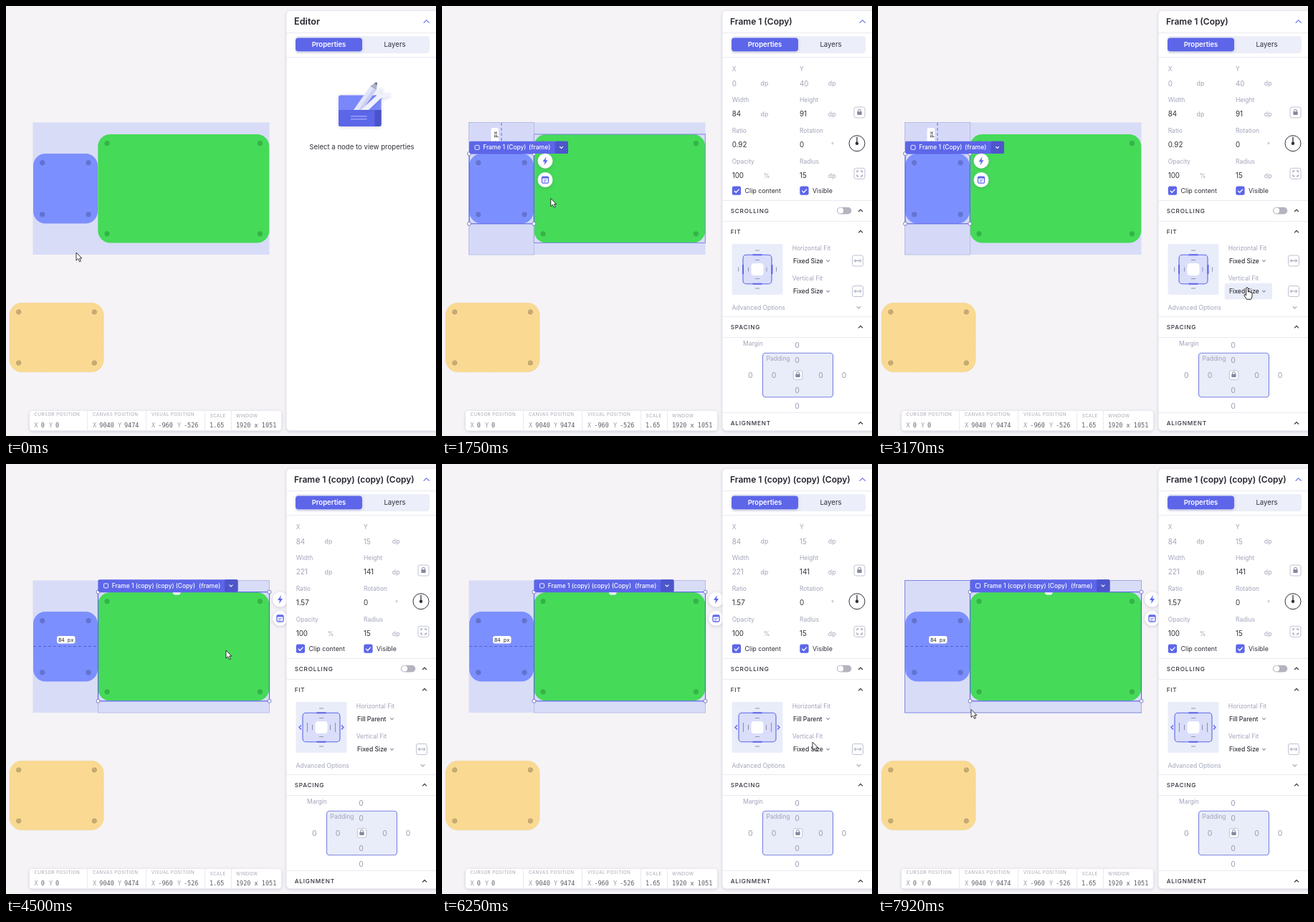
Write an HTML page that moves like this. It is 600 px wide and 600 px high and loops after 8 s.

```html
<!DOCTYPE html>
<html lang="en">
<head>
<meta charset="utf-8">
<title>Frame editor</title>
<style>
html, body { margin: 0; width: 100%; height: 100%; overflow: hidden; background: #f5f3f6; }
svg { display: block; width: 600px; height: 600px; }
text { font-family: Inter, sans-serif; white-space: pre; }
.mono { font-family: "DejaVu Sans Mono", monospace; }
.mid { text-anchor: middle; }
.caps { letter-spacing: .8px; font-weight: 500; }
.tiny { letter-spacing: .45px; }
.semi { font-weight: 600; }
.med { font-weight: 500; }
.shadow { filter: drop-shadow(0 1px 2px #4a4a7a40); }
</style>
</head>
<body>
<svg id="stage" viewBox="0 0 600 600"></svg>
<script>
const BLUE = '#5d66e9', INK = '#30303a', GREY = '#a2a4b8', PALE = '#e9ecf9', RULE = '#e9e9f3';

// Drawing helpers, all returning SVG markup
const rect = (x, y, w, h, r, fill, more = '') =>
  `<rect x="${x}" y="${y}" width="${w}" height="${h}" rx="${r}" fill="${fill}" ${more}/>`;
const path = (d, stroke, width = 1, more = '') =>
  `<path d="${d}" fill="none" stroke="${stroke}" stroke-width="${width}" ${more}/>`;
const dot = (x, y, r, fill, more = '') => `<circle cx="${x}" cy="${y}" r="${r}" fill="${fill}" ${more}/>`;
const text = (x, y, s, size, fill, cls = '', more = '') =>
  `<text x="${x}" y="${y}" font-size="${size}" fill="${fill}" class="${cls}" ${more}>${s}</text>`;
const line = (color, width = 1) => `stroke="${color}" stroke-width="${width}"`;
const group = (id, body, more = '') => `<g id="${id}" ${more}>${body}</g>`;
const chevron = (x, y, up, color, w = 3) =>
  path(`M${x - w} ${y + up * w / 2}L${x} ${y - up * w / 2}L${x + w} ${y + up * w / 2}`, color, 1.1);
const corners = (x, y, w, h, draw) =>
  [[x, y], [x + w, y], [x, y + h], [x + w, y + h]].map(p => draw(...p)).join('');

const boxes = {
  root: [37.5, 162.5, 330, 184.5],
  blue: [38, 206, 90, 97.5],
  green: [128.3, 179, 239, 151.5],
};

function card([x, y, w, h], fill, draw, more) {
  return rect(x, y, w, h, 17, fill, more) + corners(x + 12.7, y + 12.7, w - 25.6, h - 25.4, draw);
}

function canvas() {
  const ring = (x, y) => dot(x, y, 3.1, '#d9bb7c', line('#a58e60', .8))
    + path(`M${x - 1.8} ${y + 1.2}l2.8 -2.8M${x - .7} ${y + 1.8}l2.5 -2.5`, '#8d7a55', .6);
  return rect(...boxes.root, 0, '#d8dcf7')
    + card(boxes.blue, '#7c8ffe', (x, y) => dot(x, y, 3.6, '#6272cf'))
    + card(boxes.green, '#45da58', (x, y) => dot(x, y, 3.6, '#35b348'))
    + card([5, 414.2, 131.2, 96.5], '#fad992', ring, line('#e6c681', .7) + ' stroke-dasharray="1 1.4"');
}

function statusBar() {
  const label = (x, s, y = 572.4) => text(x, y, s, 6.2, '#a6a6b4', 'tiny');
  const value = (x, s, fill = '#5c5c68') => text(x, 587.6, s, 8.5, fill, 'mono');
  const pair = (x, a, y, b) => value(x, 'X', '#9c9cac') + value(x + 9.3, a)
    + value(y, 'Y', '#9c9cac') + value(y + 9, b);
  return rect(33, 565, 351, 27.5, 4, '#fff', 'class="shadow"')
    + path('M113.5 565v27M195.5 565v27M277.5 565v27M314.5 565v27', RULE)
    + label(39.5, 'CURSOR POSITION') + pair(39.5, '0', 60, '0')
    + label(121, 'CANVAS POSITION') + pair(121, '9040', 156, '9474')
    + label(203, 'VISUAL POSITION') + pair(203, '-960', 239, '-526')
    + label(284.5, 'SCALE', 574.3) + value(284, '1.65')
    + label(321, 'WINDOW', 574.3) + value(321, '1920 x 1051');
}

function roundButtons(x, y) {
  return `<g class="shadow">${dot(x, y, 10.5, '#fff')}${dot(x, y + 26.3, 10.5, '#fff')}</g>`
    + `<path d="M${x + 1.5} ${y - 6}l-5 7h3l-1 5 5 -7h-3z" fill="${BLUE}"/>`
    + rect(x - 4.5, y + 22, 9, 9, 1.5, 'none', line(BLUE, 1.3))
    + path(`M${x - 4.5} ${y + 23.3}h9`, BLUE, 2.2) + path(`M${x - 2.3} ${y + 26.7}h4.6M${x - 2.3} ${y + 28.7}h3`, BLUE, .9);
}

function tag(x, y, w, name, kindX) {
  return rect(x, y, w, 17.3, 2, BLUE) + rect(x + w - 18.5, y, 18.5, 17.3, 2, '#4d55cb')
    + rect(x + 8, y + 5.7, 6, 6, 1.2, 'none', line('#fff', .9))
    + text(x + 19.2, y + 11.6, name, 8.4, '#fff', 'med')
    + text(kindX, y + 11.6, '(frame)', 8.6, '#fff', 'med')
    + chevron(x + w - 9.5, y + 8.6, -1, '#fff', 2.4);
}

const outline = (x, y, w, h) => rect(x, y, w, h, 0, 'none', line(BLUE, 1.2))
  + corners(x, y, w, h, (a, b) => dot(a, b, 2.5, '#fff', line('#777cc0', 1)));

function selectBlue() {
  return rect(37.5, 162.5, 91, 184.5, 0, '#7c8ffe0a', line('#aeb3e0', .8))
    + path('M83 163V206', BLUE, 1, 'stroke-dasharray="4 3"')
    + rect(68.5, 170, 10.5, 26, 3, '#fff')
    + text(0, 0, '40 px', 7.5, '#222', 'mono mid', 'transform="translate(76.5 186)rotate(-90)"')
    + outline(38, 206, 90.3, 97.8) + tag(38, 188.7, 138, 'Frame 1 (Copy)', 121) + roundButtons(144, 216.2);
}

function selectGreen() {
  return rect(128.5, 162.5, 239, 184.5, 0, 'none', line('#aeb3e0', .8))
    + path('M38 254.5H128', '#5560cf', 1, 'stroke-dasharray="4 3"')
    + rect(71, 240, 25.5, 10.5, 3, '#fff') + text(83.7, 248, '84 px', 7.2, '#222', 'mono mid')
    + rect(233, 160, 10.5, 22.5, 3, '#fff')
    + outline(128.5, 178.6, 239, 152.2)
    + tag(128.5, 161.2, 195, 'Frame 1 (copy) (copy) (Copy)', 269) + roundButtons(382.5, 189);
}

function panelFrame() {
  return rect(391.5, 7, 216, 585.5, 5, '#fff', 'class="shadow"')
    + path('M392 37.5H600M392 71.5H600', RULE)
    + chevron(586.7, 21.7, 1, BLUE, 4)
    + rect(404, 42, 187, 24, 4, '#eceef9')
    + rect(404, 44.5, 93, 18.7, 4, BLUE, 'class="shadow"')
    + text(450.5, 57.4, 'Properties', 9.5, '#fff', 'mid semi')
    + text(542.5, 57.4, 'Layers', 9.6, INK, 'mid');
}

function emptyPanel() {
  return rect(464, 124.5, 59.5, 43.5, 3, '#7a87fb', 'class="shadow"')
    + '<path d="M464 145h59.500v20a3 3 0 0 1-3 3h-53.500a3 3 0 0 1-3-3z" fill="#5c66e8"/>'
    + '<path d="M514.500 145h9v20a3 3 0 0 1-3 3h-6z" fill="#4b53cb"/>'
    + path('M481 153.800h22.500M481 157.800h22.500', '#a6aefc', 1.3)
    + '<path d="M485 145L508 112 517 117 497 145z" fill="#e3e6fa"/><path d="M492 145L512.500 114.500 517 117 497 145z" fill="#cdd2f3"/>'
    + '<path d="M508 112l8-5.500 2 1.500-1 9z" fill="#aeb2c6"/><path d="M514 108l2.500-1.800 1.600 1.200-.5 3z" fill="#70758f"/>'
    + '<path d="M495 145L517 125Q515 118 523 115L527 116 522 120 526 124 535 121 536 125Q531 130 524 128L506 145z" fill="#eef0fc" class="shadow"/>'
    + text(496.5, 200.3, 'Select a node to view properties', 9.6, INK, 'mid');
}

function lock(x, y) {
  return rect(x - 3.2, y - .7, 6.4, 4.6, .8, '#85889f')
    + path(`M${x - 2} ${y}v-1.700a2 2 0 0 1 4 0v1.700`, '#85889f', 1);
}
const iconBox = (x, y, s = 15) => rect(x, y, s, s, 2.5, '#fff', line('#b9bbcf', .9));

function fitWidget(fill) {
  const x = fill ? 414 : 420, right = 880 - x;
  const ticks = 'M437 341h6M437 394h6M437 354.500h6M437 380.500h6';
  return rect(404.5, 332, 71, 70.7, 2, PALE)
    + rect(x, 347.3, right - x, 40.5, 4.5, '#dadefa', line(BLUE, 1.1))
    + path('M433.500 347.300h13M433.500 387.800h13', BLUE, 2)
    + path(ticks, '#8f93ab', 1)
    + (fill
      ? path('M412 364.500l-3 3 3 3M468 364.500l3 3 -3 3', BLUE, 1.4)
        + path('M420.500 361v13M459.500 361v13M427.500 364v7M452.500 364v7', '#8f93ab', 1.1)
      : path('M420 361v13M460.500 361v13', BLUE, 2)
        + path('M413.700 364.500v6M466.500 364.500v6M427.500 364.500v6M453 364.500v6', '#8f93ab', 1))
    + rect(431.5, 359, 17, 17, 4, '#fff');
}

function props(green) {
  const label = (x, y, s) => text(x, y, s, 8.5, '#a1a4ba');
  const value = (x, y, s, off) => text(x, y, s, 9.8, off ? GREY : INK);
  const unit = (x, y, s) => text(x, y, s, 8.8, GREY);
  const field = (col, y, name, val, u, off) => {
    const x = col ? 499 : 404.7;
    return label(x, y, name) + value(x, y + 20.3, val, off)
      + (u ? unit(u === 'dp' ? x + 39.8 : x + 44, y + 20, u) : '');
  };
  const section = (y, s) => text(402.7, y + 3.3, s, 8.2, INK, 'caps') + chevron(584, y, 1, INK);
  const check = (x, s) => rect(x, 251.5, 12.3, 12.3, 2.5, BLUE)
    + path(`M${x + 3} 257.800l2.400 2.400 4.300 -4.600`, '#fff', 1.3)
    + text(x + 17.7, 261, s, 8.9, INK);
  const menu = (y, s, box) => text(490, y + 3.1, s, 8.6, INK, 'med') + chevron(538.5, y, -1, '#8e90a6', 2.2)
    + (box ? iconBox(572.5, y - 7.5)
      + path(`M577.500 ${y - 2.3}l-2.300 2.300 2.300 2.300M582.500 ${y - 2.3}l2.300 2.300 -2.300 2.300M575.500 ${y}h9`, '#9295ad', .9) : '');
  const zero = (x, y) => text(x, y, '0', 10.5, '#999cb2', 'mid');

  return field(0, 91.3, 'X', green ? '84' : '0', 'dp', true) + field(1, 91.3, 'Y', green ? '15' : '40', 'dp', true)
    + field(0, 133.8, 'Width', green ? '221' : '84', 'dp', green) + field(1, 133.8, 'Height', green ? '141' : '91', 'dp')
    + field(0, 177, 'Ratio', green ? '1.57' : '0.92') + field(1, 177, 'Rotation', '0', '°')
    + field(0, 219.6, 'Opacity', '100', '%') + field(1, 219.6, 'Radius', '15', 'dp')
    + iconBox(575, 141) + lock(582.5, 148)
    + dot(579, 191.7, 11, '#fff', line(INK, 1)) + path('M579 191.700v-9', INK, 1.3) + dot(579, 191.7, 2.2, INK)
    + iconBox(575, 226.3)
    + path('M579 232.300v-2.300h2.300M584 230h2.300v2.300M586.300 235.300v2.300h-2.300M581.300 237.600h-2.300v-2.300', '#85889f', 1)
    + check(404.8, 'Clip content') + check(499.3, 'Visible')
    + path('M392 271.500H600M392 300.500H600M392 433.500H600M392 462.500H600M392 567.500H600', RULE)
    + section(285.5, 'SCROLLING')
    + rect(551, 280.7, 20.3, 9.8, 4.9, '#b4b4c0') + dot(556.2, 285.6, 4, '#fff')
    + section(314.8, 'FIT') + fitWidget(green)
    + label(488.7, 340.8, 'Horizontal Fit') + menu(355.5, green ? 'Fill Parent' : 'Fixed Size', !green)
    + label(488.7, 383.4, 'Vertical Fit') + menu(398, 'Fixed Size', true)
    + label(404.5, 423.7, 'Advanced Options') + chevron(581.5, 420.6, -1, GREY, 2.8)
    + section(447.8, 'SPACING')
    + label(420, 473.7, 'Margin') + zero(495.5, 477.2) + zero(430.3, 519.2) + zero(561, 519.2) + zero(495.5, 561.5)
    + rect(447.5, 484.3, 98, 61.5, 4, PALE, line('#7982e0', 1.1))
    + label(452.5, 494.6, 'Padding') + zero(495.5, 498) + zero(463, 519.2) + zero(528.5, 519.2) + zero(495.5, 540.3)
    + iconBox(490.3, 508.7, 12.5) + lock(496.5, 514.2)
    + section(582, 'ALIGNMENT');
}

const arrow = '<path id="arrow" d="M0 0V11L2.600 8.700 4.600 12.800 6.400 12 4.600 8H7.900Z" fill="#fff" stroke="#222" stroke-width=".9"/>';
const hand = '<path id="hand" d="M-1.400 1.200a1.400 1.400 0 0 1 2.800 0V6Q4 5 4.300 6.600 6.600 6 7 8.200V11.500Q7 14 5.400 16.300H-.4L-3.800 11.500Q-4.600 9.600 -3 9.400L-1.400 10.800Z" fill="#fff" stroke="#222" stroke-width="1"/>'
  ;

stage.innerHTML = '<clipPath id="titleClip"><rect x="402" y="8" width="176" height="28"/></clipPath>'
  + canvas() + rect(0, 0, 0, 0, 0, 'none', 'id="hover" ' + line('#7f86e2', 1))
  + group('blueSel', selectBlue()) + group('greenSel', selectGreen())
  + statusBar() + panelFrame()
  + `<g clip-path="url(#titleClip)">${text(402, 25.8, '', 12, '#25252e', 'semi', 'id="heading"')}</g>`
  + group('emptyProps', emptyPanel())
  + rect(483.7, 0, 66.3, 22.5, 2.5, PALE, 'id="menuHover"')
  + group('blueProps', props(false)) + group('greenProps', props(true))
  + group('cursor', arrow + hand);

const $ = id => document.getElementById(id);
const show = (id, on) => $(id).setAttribute('display', on ? 'inline' : 'none');
const set = (id, attrs) => { for (const k in attrs) $(id).setAttribute(k, attrs[k]); };

// Cursor moves: first step, last step, x, y (12 steps a second)
const moves = [
  [0, 3, 55, 245], [18, 28, 503, 354], [28, 30, 507, 355], [31, 36, 515, 393], [39, 47, 307, 260],
  [58, 68, 517, 353], [72, 75, 517, 388], [75, 78, 518, 394], [79, 82, 528, 374], [87, 95, 130, 342.5],
];
// Hovered dropdowns: first step, step after last, top edge
const menus = [[29, 33, 344.3], [36, 40, 386.8], [68, 73, 344.3], [77, 81, 386.8]];

function cursorAt(step) {
  let x = 98, y = 344;
  for (const [from, to, tx, ty] of moves) {
    const p = Math.min(1, Math.max(0, (step - from) / (to - from)));
    const e = p * p * (3 - 2 * p);
    x += (tx - x) * e;
    y += (ty - y) * e;
  }
  return [x, y];
}

function draw(step) {
  const selected = step < 14 ? 'none' : step < 54 ? 'blue' : 'green';
  const [x, y] = cursorAt(step);
  for (const s of ['blue', 'green']) {
    show(s + 'Sel', s === selected);
    show(s + 'Props', s === selected);
  }
  show('emptyProps', selected === 'none');

  $('heading').textContent = { none: 'Editor', blue: 'Frame 1 (Copy)', green: 'Frame 1 (copy) (copy) (Copy)' }[selected];
  set('heading', { x: 402 - ({ 14: 66, 15: 22 }[step] || 0), 'font-size': selected === 'none' ? 12.7 : 12 });

  const inside = ([bx, by, w, h]) => x > bx && x < bx + w && y > by && y < by + h;
  const over = step > 0 && ['blue', 'green', 'root'].find(k => inside(boxes[k]));
  show('hover', over && over !== selected);
  if (over) {
    const [bx, by, w, h] = boxes[over];
    set('hover', { x: bx, y: by, width: w, height: h });
  }

  const menu = menus.find(([from, to]) => step >= from && step < to);
  show('menuHover', menu);
  if (menu) set('menuHover', { y: menu[2] });
  const pointing = menu && step !== 68;
  show('hand', pointing);
  show('arrow', !pointing);
  set('cursor', { transform: `translate(${x} ${y})` });
}

let last = -1;
function tick() {
  const step = Math.floor((performance.now() % 8000 + 5) * 12 / 1000) % 96;
  if (step !== last) draw(last = step);
  requestAnimationFrame(tick);
}
tick();
</script>
</body>
</html>
```
